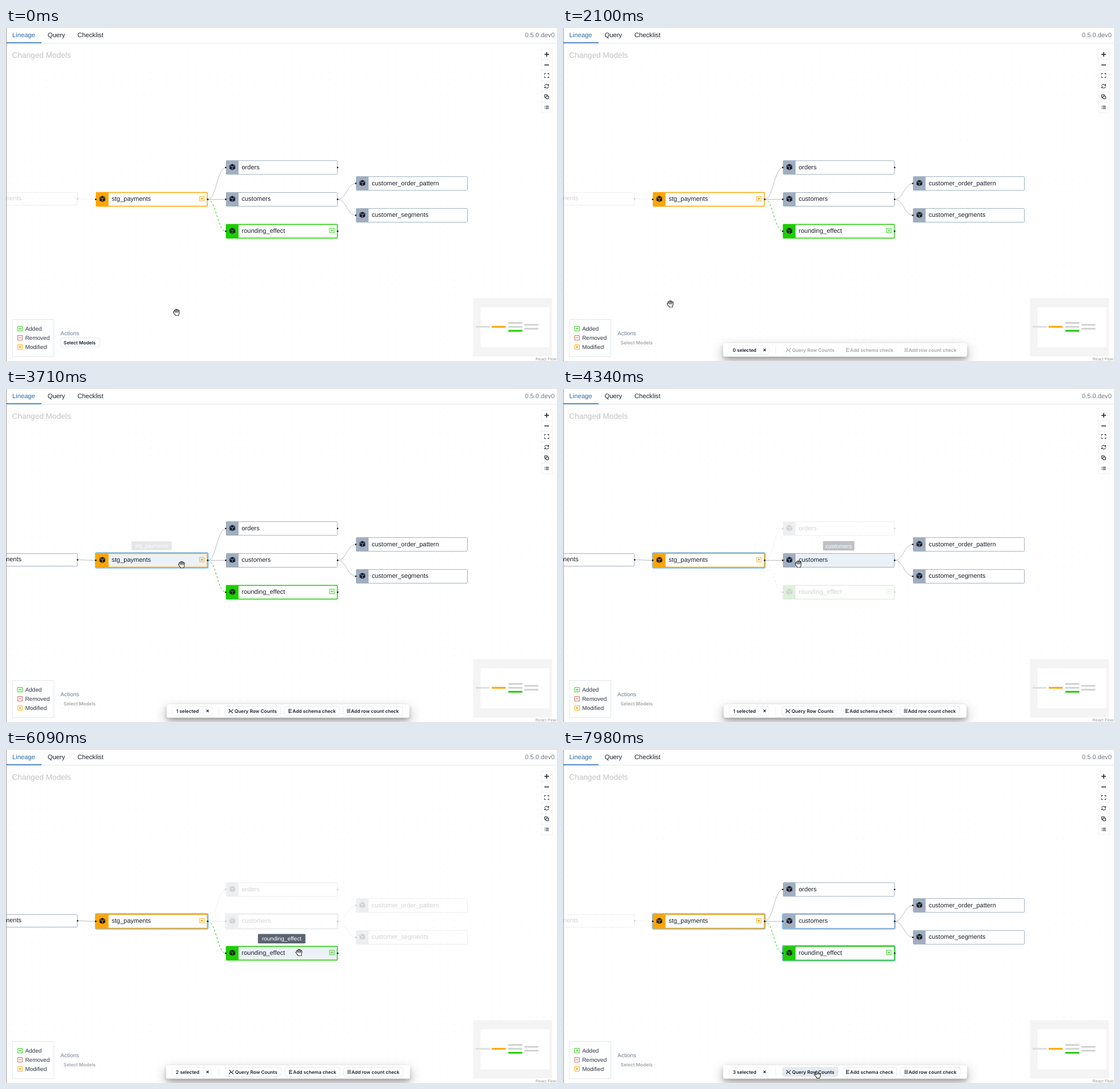
These frames come from a looping animation (962x582 px, 8000 ms). An HTML page:

```html
<!DOCTYPE html>
<html lang="en">
<head>
<meta charset="utf-8">
<title>Lineage</title>
<style>
  html, body { margin: 0; width: 100%; height: 100%; overflow: hidden; background: #fff; }
  svg { display: block; width: 962px; height: 582px; text-rendering: geometricPrecision;
        font: 11px "Liberation Sans", Arial, sans-serif; fill: #1a202c; }
  .bold { font: 600 8.2px Inter, sans-serif; }
  .small { font-size: 10px; fill: #2d3748; }
  .line { fill: none; stroke: currentColor; }
  .box { fill: #fff; stroke: #e2e8f0; }
  .dim { filter: opacity(.2) grayscale(.5); }
  .ring { fill: none; stroke: rgba(66,153,225,.65); stroke-width: 2; display: none; }
  .selected .ring { display: inline; }
  .hover .body { fill: #ebf2f7; }
  .shadow { filter: drop-shadow(0 3px 3px rgba(0,0,0,.2)) drop-shadow(0 8px 10px rgba(0,0,0,.3)); }
  .disabled { opacity: .4; }
  .disabled .box { stroke: #f4f6f9; }
  .hot .box { fill: #e6ebf1; }
  .hand { stroke: #111; stroke-width: 3; stroke-linecap: round; stroke-linejoin: round; fill: #111; }
  .hand + .hand { stroke: #fff; stroke-width: 1.2; fill: #fff; }
</style>
</head>
<body>
<svg id="stage" viewBox="0 0 962 582"></svg>
<script>
const GREY = '#a0aec0', AMBER = '#ffa502', GREEN = '#1dce00', RED = '#d0584a';
const WIDTH = 194, LOOP = 8000;

// id: [left, middle, colour, badge]
const nodes = {
  raw_payments: [-69.5, 298.6, GREY],
  stg_payments: [157.5, 299.5, AMBER, 'modified'],
  orders: [384.5, 243.8, GREY],
  customers: [384.5, 299.5, GREY],
  rounding_effect: [384.5, 355.2, GREEN, 'added'],
  customer_order_pattern: [611.5, 271.7, GREY],
  customer_segments: [611.5, 327.4, GREY]
};
const edges = [
  ['raw_payments', 'stg_payments'], ['stg_payments', 'orders'], ['stg_payments', 'customers'],
  ['stg_payments', 'rounding_effect'], ['customers', 'customer_order_pattern'], ['customers', 'customer_segments']
];
const hovers = [
  { id: 'stg_payments', from: 3000, to: 4110, click: 3570, tip: 75, dims: [] },
  { id: 'customers', from: 4260, to: 5585, click: 5320, tip: 55, dims: ['orders', 'rounding_effect'] },
  { id: 'rounding_effect', from: 5890, to: 6660, click: 6510, tip: 83,
    dims: ['orders', 'customers', 'customer_order_pattern', 'customer_segments'] }
];
const PANEL_OPEN = 1260, PRESS = 140;

// time, x, y, eased
const cursorPath = [
  [0, 298, 497], [140, 298, 497], [700, 140, 555, 1], [1260, 140, 555], [1540, 151, 565, 1],
  [1820, 151, 565], [2100, 187.5, 482.5], [2660, 282, 341], [3000, 300, 312], [3150, 307, 307],
  [3920, 307, 307], [4340, 411, 306], [4760, 491, 308], [4970, 514.5, 308], [5480, 514.5, 308],
  [6090, 512, 354, 1], [6230, 512, 356], [6580, 512, 356], [6860, 494.5, 397.5], [7140, 469, 463],
  [7840, 446, 566], [7980, 444.5, 567], [8000, 444.5, 567]
];

const text = (x, y, value, attrs = '') => `<text x="${x}" y="${y}" ${attrs}>${value}</text>`;
const rect = (x, y, w, h, attrs = '') => `<rect x="${x}" y="${y}" width="${w}" height="${h}" ${attrs}/>`;
const line = (d, color, width = 1, attrs = '') =>
  `<path class="line" d="${d}" style="color:${color}" stroke-width="${width}" ${attrs}/>`;
const at = (x, y, content, attrs = '') => `<g transform="translate(${x} ${y})" ${attrs}>${content}</g>`;
const dot = (x, y) => `<circle cx="${x}" cy="${y}" r="1.4"/>`;

function badge(x, y, kind) {
  const color = { added: GREEN, removed: RED, modified: AMBER }[kind];
  const mark = { added: line('M-2.2 0H2.2M0-2.2V2.2', color, .9), removed: line('M-2.2 0H2.2', color, .9),
    modified: `<circle r="1.8" fill="${color}"/>` }[kind];
  return at(x, y, rect(-3.9, -3.9, 7.8, 7.8, `fill="none" stroke="${color}" stroke-width=".9"`) + mark);
}

const cube = color => '<path d="M0-5.4L5-3V3L0 5.4L-5 3V-3Z"/>' +
  line('M-4.4-2.5L0-.4L4.4-2.5M0-.4V4.8', color, .9);

function node(id) {
  const [x, y, color, kind] = nodes[id];
  const h = id === 'raw_payments' ? 22 : 24, shift = id === 'raw_payments' ? -2 : 0;
  const border = `rx="1" stroke="${color}" stroke-width="${kind ? 1.5 : 1}"`;
  return `<g id="${id}">` +
    rect(x - 1.2, y - h / 2 - 1.2, WIDTH + 2.4, h + 2.4, 'class="ring" rx="2"') +
    rect(x, y - h / 2, WIDTH, h, `class="body" fill="#fff" ${border}`) +
    rect(x, y - h / 2, 21.5, h, `fill="${color}"`) +
    at(x + 10.7, y - .8, cube(color)) +
    text(x + 27 + shift, y + 2.8, id) +
    (kind ? badge(x + 184.5, y - 1.3, kind) : '') +
    (x > 600 ? '' : dot(x + WIDTH + .5, y)) + dot(x - .8, y) + '</g>';
}

function edge([from, to], i) {
  const x1 = nodes[from][0] + WIDTH, y1 = nodes[from][1], x2 = nodes[to][0], y2 = nodes[to][1];
  const mid = (x1 + x2) / 2, added = to === 'rounding_effect';
  return line(`M${x1} ${y1}C${mid} ${y1} ${mid} ${y2} ${x2} ${y2}`, added ? GREEN : '#aaaab0', added ? 1 : .8,
    `id="edge${i}" ${added ? 'stroke-dasharray="3.4"' : ''}`);
}

function controls() {
  const icons = [
    'M-4 0H4M0-4V4', 'M-4 0H4',
    'M-3.8-1.5V-3.6H-1.5M1.5-3.6H3.8V-1.5M3.8 1.5V3.6H1.5M-1.5 3.6H-3.8V1.5',
    'M-3.6-.6A3.6 3.4 0 0 1 3-1.8M3.5-3.6V-1.3H1.2M3.6.6A3.6 3.4 0 0 1-3 1.8M-3.5 3.6V1.3H-1.2',
    'M-1.2-1.2H3.5V3.5H-1.2ZM-1.2 1.2H-3.5V-3.5H1.2V-1.2',
    'M-3.6-2.2H-2.6M-1.6-2.2H3.6M-3.6 0H-2.6M-1.6 0H3.6M-3.6 2.2H-2.6M-1.6 2.2H3.6'
  ];
  return rect(934.5, 37, 19.5, 111, 'fill="#fff" stroke="#f1f1f1"') + icons.map((d, i) =>
    at(944, 46 + i * 18.55, line(d, '#1a202c', i < 2 ? 1.5 : 1) +
      (i < 5 ? line('M-9 9.3H9.5', '#eee') : ''))).join('');
}

function minimap() {
  const bar = (x, y, color) => rect(x, y - 1.5, 24.5, 3, `fill="${color}"`);
  return rect(815.5, 472, 137.5, 102, 'fill="#f4f4f4"') + rect(828.5, 488, 120.5, 70, 'fill="#fff"') +
    bar(820, 522.2, '#dedede') + bar(848, 522.2, AMBER) + bar(877, 515.5, '#d2d2d2') +
    bar(877, 522.2, '#d2d2d2') + bar(877, 529.2, GREEN) + bar(905, 518.8, '#d2d2d2') + bar(905, 525.6, '#d2d2d2');
}

const button = (x, w, label, icon, labelX, id = '') => `<g id="${id}" class="action">` +
  rect(x, 554.5, w, 16, 'class="box" rx="4"') + line(icon, '#1a202c', 1.1) +
  text(labelX, 565.6, label, 'class="bold"') + '</g>';

const panel = '<g id="panel"><rect id="sheet" class="shadow" y="551" height="23.5" rx="3.5" fill="#fff"/>' +
  rect(290, 554.5, 70, 16, 'class="box" rx="4" style="stroke:#edf2f7"') + line('M344.5 554.5V570.5', '#edf2f7') +
  text(317, 565.6, '', 'id="count" class="bold" text-anchor="middle"') +
  line('M350 560.7L354 564.7M354 560.7L350 564.7', '#1a202c', 1.2) + line('M371.5 556V570', '#e8ecf1') +
  '<g id="actions">' +
  button(383, 97.5, 'Query Row Counts', 'M390 566.5L392 562L394 564L397.5 559.5M390 559.5L392 561M395 564.5L397 566.5', 400, 'query') +
  button(487, 96, 'Add schema check', 'M495 559V566.5M495 560H497M495 565.5H497M497 560H500M497 565.5H500M495 562.7H499', 501.3) +
  button(589.5, 104, 'Add row count check', 'M596 560H602.5M596 562.6H602.5M596 565.2H602.5', 603.2) +
  '</g></g>';

const tips = hovers.map((h, i) => at(nodes[h.id][0] + 96.8, nodes[h.id][1] - 25.5,
  `<g id="tip${i}">` + rect(-h.tip / 2, -8.3, h.tip, 16.6, 'rx="1.5" fill="#2d3748"') +
  text(0, 3.6, h.id, 'text-anchor="middle" font-size="10" fill="#fff"') + '</g>')).join('');

const hand = (id, d) => `<g id="${id}"><path class="hand" d="${d}"/><path class="hand" d="${d}"/></g>`;
const cursor = '<g id="cursor"><circle id="press" cx="-1" cy="-1.5" r="22" fill="none" stroke="#222" stroke-width="1.2" opacity=".6"/>' +
  hand('grab', 'M-3 1L-3.7-2.8M-1 0L-1.3-4.4M1.2 0L1.3-4.2M3.3 1L3.8-2.6M-2.6 3L-5-.1M-3 1H3.3L2.6 4.6H-1.4Z') +
  hand('point', 'M-1.7 1V-5M.4 .6V-1.2M2.4 .8V-.8M4.2 1.6V.2M-2.4 3L-4.6.5M-1.7 1H4.2L3 5.4H-1Z') + '</g>';

const dots = '<pattern id="dots" x="1" y="7" width="12.95" height="12.95" patternUnits="userSpaceOnUse">' +
  '<circle cx="6" cy="6" r=".45" fill="#ccc"/></pattern>';
const legend = rect(11.5, 509.5, 72, 65, 'class="box"') + ['Added', 'Removed', 'Modified'].map((name, i) =>
  badge(24.5, 525.5 + i * 16, name.toLowerCase()) + text(33.4, 529.2 + i * 16, name, 'class="small"')).join('');

document.getElementById('stage').innerHTML = dots + rect(0, 27, 962, 555, 'fill="url(#dots)"') +
  line('M0 26.5H962', '#e2e8f0') + line('M0 25.8H62', '#2b6cb0', 1.5) +
  text(11, 16, 'Lineage', 'font-size="11.2" fill="#2b6cb0"') + text(72.7, 16, 'Query', 'font-size="11.2"') +
  text(124.7, 16, 'Checklist', 'font-size="11.2"') + text(906, 16, '0.5.0.dev0', 'font-size="11.1" fill="#6f7885"') +
  text(10.6, 52.3, 'Changed Models', 'font-size="13.6" fill="#c2c2c2"') +
  edges.map(edge).join('') + Object.keys(nodes).map(node).join('') + tips +
  controls() + minimap() + text(924.6, 580.5, 'React Flow', 'font-size="7.3" fill="#999"') + legend +
  text(95, 537, 'Actions', 'class="small" style="fill:#718096"') +
  '<g id="select">' + rect(95, 541.5, 69, 16, 'class="box" rx="4"') +
  text(100.6, 552.6, 'Select Models', 'class="bold"') + '</g>' + panel +
  line('M.5 0V582', '#9a9a9a') + cursor;

const el = {};
document.querySelectorAll('[id]').forEach(e => el[e.id] = e);
const clamp = v => Math.min(1, Math.max(0, v));
const show = (e, on) => e.style.display = on ? 'inline' : 'none';

function cursorAt(t) {
  const i = cursorPath.findIndex(p => p[0] > t);
  const [t0, x0, y0] = cursorPath[i - 1], [t1, x1, y1, eased] = cursorPath[i];
  let u = (t - t0) / (t1 - t0);
  if (eased) u = u * u * (3 - 2 * u);
  return [x0 + (x1 - x0) * u, y0 + (y1 - y0) * u];
}

function render(t) {
  const hover = hovers.find(h => t >= h.from && t < h.to);
  const dims = hover ? hover.dims : ['raw_payments'];
  const picked = hovers.filter(h => t >= h.click);

  for (const id in nodes) {
    el[id].classList.toggle('dim', dims.includes(id));
    el[id].classList.toggle('hover', !!hover && hover.id === id);
    el[id].classList.toggle('selected', picked.some(h => h.id === id));
  }
  edges.forEach((ends, i) => el['edge' + i].classList.toggle('dim', ends.some(id => dims.includes(id))));

  hovers.forEach((h, i) => {
    const leaving = clamp((t - h.click) / 160);
    const tip = el['tip' + i];
    tip.setAttribute('opacity', clamp((t - h.from) / 260) * (1 - leaving));
    tip.setAttribute('transform', `scale(${1 - .07 * leaving})`);
  });

  const rise = (1 - clamp((t - PANEL_OPEN) / 280)) ** 3;
  const narrow = picked.length === 1 ? 1 : 0;
  show(el.panel, t >= PANEL_OPEN);
  el.panel.setAttribute('transform', `translate(0 ${45 * rise})`);
  el.sheet.setAttribute('x', 279.5 + narrow);
  el.sheet.setAttribute('width', 426 - 2 * narrow);
  el.count.textContent = picked.length + ' selected';
  el.actions.setAttribute('transform', `translate(${-narrow} 0)`);
  el.actions.setAttribute('class', picked.length ? '' : 'disabled');
  el.query.classList.toggle('hot', t >= 7720);
  el.select.setAttribute('class', t >= PANEL_OPEN ? 'disabled' : '');

  const pointing = t >= 620 && t < PANEL_OPEN || t >= 7720;
  el.cursor.setAttribute('transform', `translate(${cursorAt(t)})`);
  show(el.point, pointing);
  show(el.grab, !pointing);
  show(el.press, [PANEL_OPEN, ...hovers.map(h => h.click)].some(c => t >= c - PRESS && t < c));
}

const start = performance.now();
(function tick() {
  render((performance.now() - start) % LOOP);
  requestAnimationFrame(tick);
})();
</script>
</body>
</html>
```
